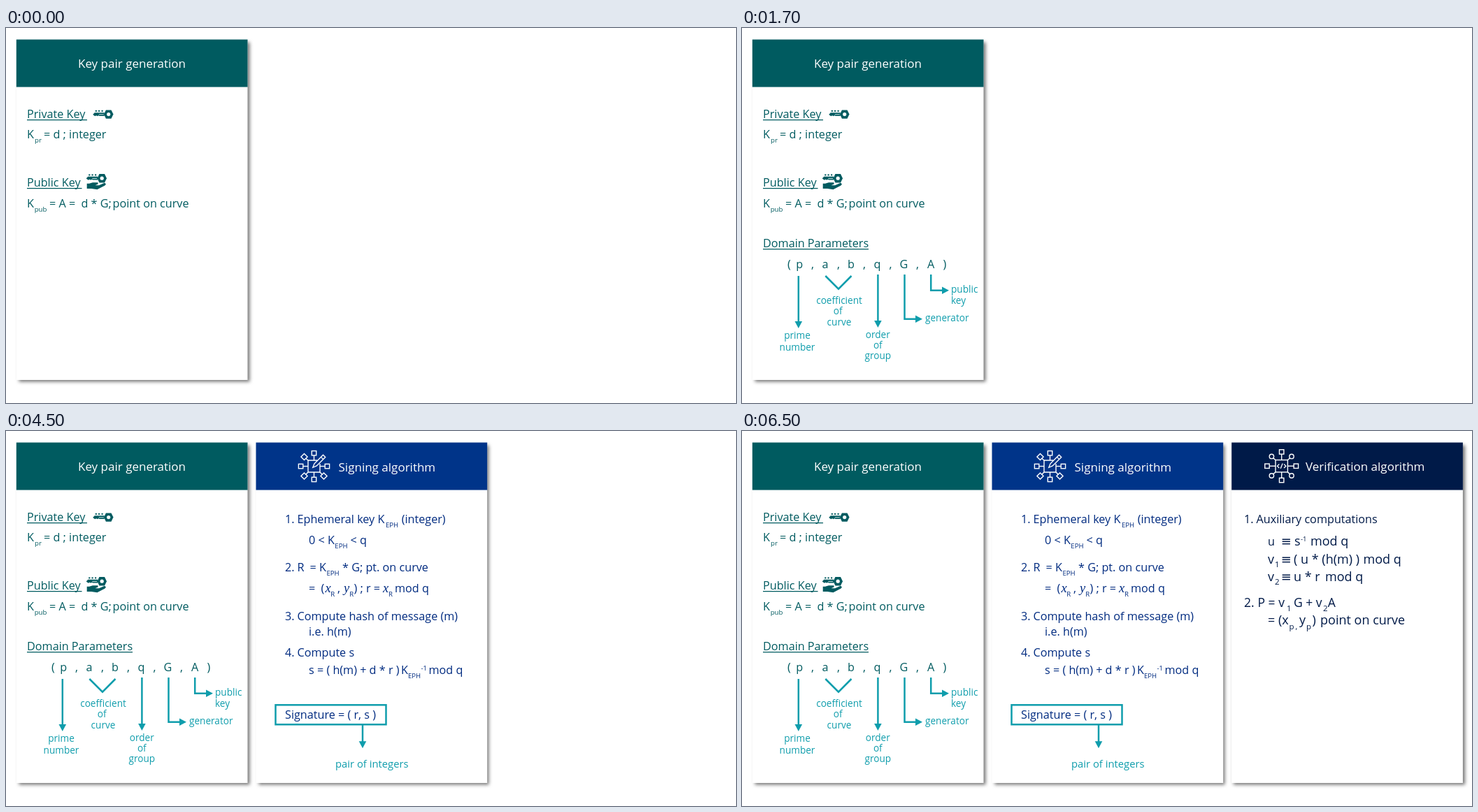
An HTML page with a canvas for the animation above (8000 ms loop, 1044 px wide and 537 px high).

```html
<!DOCTYPE html>
<html lang="en">
<head>
<meta charset="utf-8">
<title>Digital signature steps</title>
<style>
html, body { margin: 0; width: 100%; height: 100%; overflow: hidden; background: #fff; }
canvas { display: block; }
</style>
</head>
<body>
<canvas id="stage" width="1044" height="537"></canvas>
<script>
const ctx = document.getElementById('stage').getContext('2d');
const LOOP = 8000;
const SANS = '"Open Sans", "Noto Sans", "DejaVu Sans", sans-serif';
const GREEN = '#005b60', BLUE = '#003489', NAVY = '#001a48', TEAL = '#0f9dac';
const BODY = 16.2, BIG = 18, HEAD = 17, SUB = 9.6;

let ink = GREEN;

function text(str, x, y, size = BODY, align = 'left', font = SANS) {
  ctx.font = size + 'px ' + font;
  ctx.fillStyle = ink;
  ctx.textAlign = align;
  ctx.fillText(str, x, y);
}

// Pairs of string and x on one baseline
function row(y, size, ...runs) {
  for (let i = 0; i < runs.length; i += 2) text(runs[i], runs[i + 1], y, size);
}

function math(str, x, y) {
  text(str, x, y, 19, 'left', 'italic 1px'.slice(0, 0) + '"Liberation Serif", serif');
}

function italic(str, x, y) {
  ctx.font = 'italic 18.5px "Liberation Serif", "Noto Serif", serif';
  ctx.fillStyle = ink;
  ctx.textAlign = 'left';
  ctx.fillText(str, x, y);
}

function trace(points, closed) {
  ctx.beginPath();
  for (let i = 0; i < points.length; i += 2) ctx.lineTo(points[i], points[i + 1]);
  if (closed) ctx.closePath();
}

function line(color, width, ...points) {
  trace(points);
  ctx.strokeStyle = color;
  ctx.lineWidth = width;
  ctx.stroke();
}

function shape(color, ...points) {
  trace(points, true);
  ctx.fillStyle = color;
  ctx.fill();
}

function outline(x, y, w, h, color = '#fff', width = 1.4) {
  ctx.strokeStyle = color;
  ctx.lineWidth = width;
  ctx.strokeRect(x, y, w, h);
}

function ring(x, y, r) {
  ctx.beginPath();
  ctx.arc(x, y, r, 0, Math.PI * 2);
  ctx.strokeStyle = '#fff';
  ctx.lineWidth = 1.4;
  ctx.stroke();
}

function arrowDown(x, top, tip) {
  line(TEAL, 2.5, x, top, x, tip - 9);
  shape(TEAL, x - 5.3, tip - 10, x + 5.3, tip - 10, x, tip);
}

function arrowRight(x, top, y, tip) {
  line(TEAL, 2.5, x, top, x, y, tip - 9, y);
  shape(TEAL, tip - 10, y - 5.3, tip - 10, y + 5.3, tip, y);
}

function panel(x, color) {
  ctx.save();
  ctx.shadowColor = 'rgba(0,0,0,.55)';
  ctx.shadowBlur = 5;
  ctx.shadowOffsetX = ctx.shadowOffsetY = 3;
  ctx.fillStyle = '#fff';
  ctx.fillRect(x, 16.5, 330.7, 487.5);
  ctx.restore();
  ctx.fillStyle = color;
  ctx.fillRect(x, 16.5, 330.7, 68);
}

function underlined(str, y, right) {
  text(str, 30, y);
  line(GREEN, 1.2, 30, y + 2.6, right, y + 2.6);
}

// Key with its head centred on (x, y)
function keyIcon(x, y) {
  ctx.save();
  ctx.translate(x, y);
  shape(GREEN, -22.5, 0.3, -20, -2.4, -6, -2.4, -6, 2.4, -13, 2.4, -14.5, 1.6, -16, 2.6, -17.5, 1.6, -19.5, 2.6);
  line('#fff', 0.8, -14, 0.2, -7, 0.2);
  shape(GREEN, -6.6, 0, -3.8, -6.2, 3.8, -6.2, 6.8, 0, 3.8, 6.2, -3.8, 6.2);
  ctx.fillStyle = '#fff';
  ctx.beginPath();
  ctx.arc(0, 0, 2.6, 0, Math.PI * 2);
  ctx.fill();
  ctx.fillStyle = GREEN;
  for (const dx of [-19, -14.7, -10.2]) ctx.fillRect(dx, -5.8, 2.2, 2);
  ctx.restore();
}

function handIcon() {
  shape(GREEN, 115.7, 222.8, 119, 222.8, 124, 221.2, 131.5, 221.2, 131.5, 223.5, 127.5, 225.3,
    133, 225.3, 141, 221.7, 143, 223.5, 141.5, 225.5, 130.5, 231.2, 122, 230, 115.7, 230);
}

function signIcon() {
  const cx = 440.5, cy = 50.5;
  const white = '#fff';
  outline(437.3, 28.5, 6.4, 6.4);
  outline(437.3, 66.2, 6.4, 6.4);
  outline(418.4, 47.3, 6.4, 6.4);
  outline(456.2, 47.3, 6.4, 6.4);
  for (const [x, y] of [[426.5, 37], [426.5, 64.5], [454.5, 64.5]]) {
    trace([x, y - 4.6, x + 4.6, y, x, y + 4.6, x - 4.6, y], true);
    ctx.stroke();
  }
  line(white, 1.4, 445, 42, 432, 42, 432, 59, 449, 59, 449, 47);
  line(white, 1.4, cx, 35, cx, 42);
  line(white, 1.4, cx, 59, cx, 66);
  line(white, 1.4, 425, cy, 432, cy);
  line(white, 1.4, 449, cy, 456, cy);
  line(white, 1.4, 429, 39.5, 432, 42);
  line(white, 1.4, 429, 62, 432, 59);
  line(white, 1.4, 452, 62, 449, 59);
  trace([438.8, 52.3, 441, 46.8, 453.5, 34.3, 456.7, 37.5, 444.2, 50], true);
  ctx.fillStyle = BLUE;
  ctx.fill();
  ctx.stroke();
  line(white, 1.2, 450.5, 37.3, 453.7, 40.5);
}

function verifyIcon() {
  const cx = 771.7, cy = 50.2;
  outline(763, 41.5, 17.4, 17.4);
  for (const s of [-1, 1]) {
    outline(cx - 3.2, cy + s * 20.3 - 3.2, 6.4, 6.4);
    outline(cx + s * 20.7 - 3.2, cy - 3.2, 6.4, 6.4);
    line('#fff', 1.4, cx, cy + s * 8.7, cx, cy + s * 17);
    line('#fff', 1.4, cx + s * 8.7, cy, cx + s * 17.5, cy);
    line('#fff', 1.3, cx + s * 3.4, cy - 2.8, cx + s * 6.2, cy, cx + s * 3.4, cy + 2.8);
    for (const v of [-1, 1]) {
      ring(cx + s * 14.3, cy + v * 13.8, 3.2);
      line('#fff', 1.4, cx + s * 8.7, cy + v * 8.7, cx + s * 12, cy + v * 11.5);
    }
  }
  line('#fff', 1.3, cx + 1.4, cy - 3.6, cx - 1.4, cy + 3.6);
}

function keyPanel() {
  panel(14.8, GREEN);
  ink = '#fff';
  text('Key pair generation', 180, 57, HEAD, 'center');
  ink = GREEN;
  underlined('Private Key', 129, 116);
  keyIcon(146.7, 123.6);
  row(158, BODY, 'K', 30, '= d ; integer', 54);
  text('pr', 41, 164, SUB);
  underlined('Public Key', 227, 108.5);
  keyIcon(137.2, 215.2);
  handIcon();
  row(257, BODY, 'K', 30, '= A =', 62, 'd * G;', 107.5, 'point on curve', 152.5);
  text('pub', 40.7, 263, SUB);
}

function domain() {
  ink = GREEN;
  underlined('Domain Parameters', 314, 181);
  const xs = [67.5, 82.3, 101, 119, 138, 156, 175, 193.5, 212.5, 231.5, 251, 270, 290];
  [...'(p,a,b,q,G,A)'].forEach((c, i) => text(c, xs[i], 344, BODY, 'center'));
  arrowDown(80.8, 355, 430);
  line(TEAL, 2.5, 119.3, 355, 138, 373.7, 156.5, 355);
  arrowDown(194.4, 353, 429);
  arrowRight(232.5, 353, 416.8, 258);
  arrowRight(270.2, 353, 375.8, 296);
  ink = TEAL;
  const label = (str, x, y, align = 'center') => text(str, x, y, 13.6, align);
  label('coefficient', 139, 395);
  label('of', 137.2, 410);
  label('curve', 139, 425.5);
  label('prime', 79, 445);
  label('number', 79, 462);
  label('order', 194.3, 444);
  label('of', 194.3, 459);
  label('group', 194.3, 474);
  label('public', 299, 379, 'left');
  label('key', 299, 395, 'left');
  label('generator', 262, 420, 'left');
}

function signPanel() {
  panel(357.5, BLUE);
  signIcon();
  ink = '#fff';
  text('Signing algorithm', 475.5, 58, HEAD);
  ink = '#002b80';
  row(132, BODY, '1.', 399, 'Ephemeral key K', 416.5, '(integer)', 565.7);
  text('EPH', 543, 138, SUB);
  row(162, BODY, '0 < K', 433, '< q', 492.5);
  text('EPH', 470.3, 168, SUB);
  row(201, BODY, '2.', 399, 'R', 416.5, '= K', 434.5, '* G; pt. on curve', 481);
  text('EPH', 458.5, 207, SUB);
  row(231, BODY, '=', 433, '(', 450.5, ',', 474, ')', 497.5, '; r =', 506.5, 'mod q', 556);
  italic('x', 456.5, 231);
  italic('y', 483, 231);
  italic('x', 539, 231);
  row(237, SUB, 'R', 464.2, 'R', 491.2, 'R', 547);
  row(271, BODY, '3.', 399, 'Compute hash of message (m)', 416.5);
  text('i.e. h(m)', 433, 293);
  row(323, BODY, '4.', 399, 'Compute s', 416.5);
  row(348, BODY, 's = ( h(m) + d * r )', 433, 'K', 565, 'mod q', 604.5);
  text('EPH', 575, 354, SUB);
  text('-1', 593.5, 343, SUB);
}

function signature() {
  outline(385.5, 392.3, 158, 28, TEAL, 2.5);
  ink = '#002b80';
  text('Signature = ( r, s )', 399, 411.7);
  arrowDown(510, 421, 454.3);
  ink = TEAL;
  text('pair of integers', 523.3, 482, 14.8, 'center');
}

function verifyPanel() {
  panel(700.2, NAVY);
  verifyIcon();
  ink = '#fff';
  text('Verification algorithm', 806, 56.5, HEAD);
  ink = NAVY;
  row(132, BODY, '1.', 718, 'Auxiliary computations', 735.5);
  text('u', 752, 164, BODY);
  row(164, BIG, '≡', 770.8, 's', 790, 'mod q', 813);
  text('-1', 799, 158, SUB);
  row(190, BIG, 'v', 752, '≡', 770.8, '( u * (h(m) )', 789, 'mod q', 888.5);
  row(215, BIG, 'v', 752, '≡', 770.8, 'u * r', 789, 'mod q', 834);
  text('1', 762, 195, 11.5);
  text('2', 762, 220, 11.5);
  row(252, 17.5, '2.', 718, 'P = v', 737.5, 'G + v', 789, 'A', 837.8);
  row(258, 11.5, '1', 779, '2', 831);
  row(277, BIG, '= (x', 752, 'y', 797, ')', 815.5, 'point on curve', 827);
  row(284, 11.5, 'p', 782.5, ',', 791.5, 'p', 807);
}

const steps = [[0, keyPanel], [500, domain], [2500, signPanel], [4500, signature], [6500, verifyPanel]];

function draw(now) {
  const t = now % LOOP;
  ctx.fillStyle = '#fff';
  ctx.fillRect(0, 0, 1044, 537);
  for (const [start, paint] of steps) if (t >= start) paint();
  requestAnimationFrame(draw);
}
requestAnimationFrame(draw);
</script>
</body>
</html>
```
